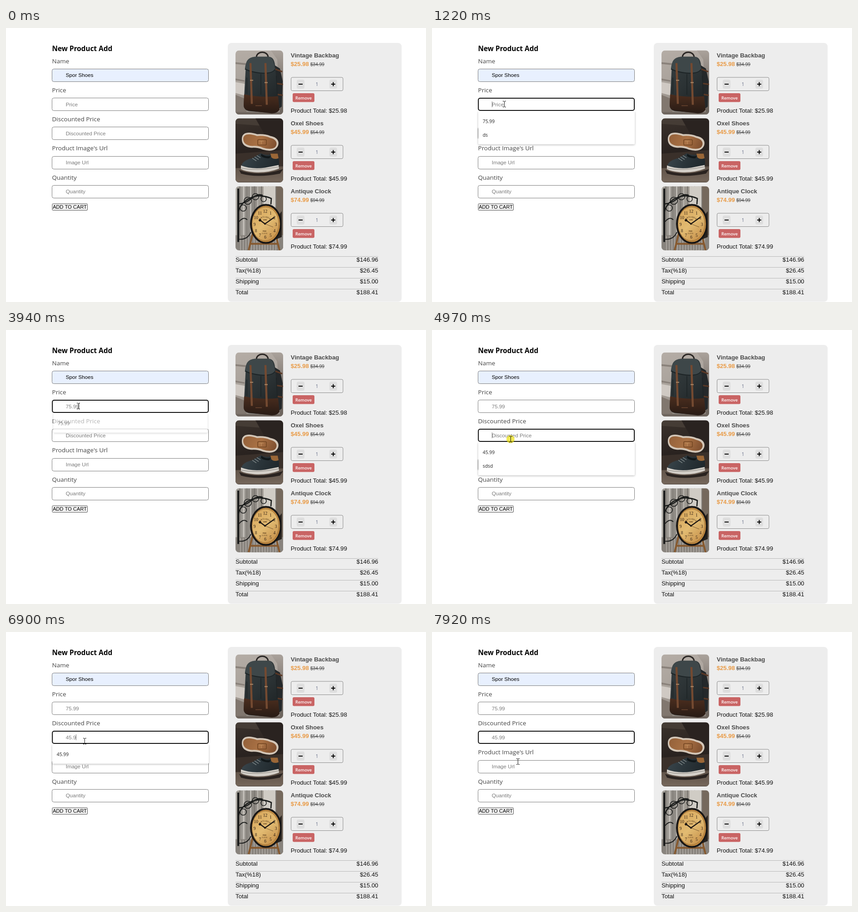
Write an HTML page with a canvas that moves like this. It is 926 px wide and 605 px high and loops after 8000 ms.

```html
<!DOCTYPE html>
<html lang="en">
<head>
<meta charset="utf-8">
<title>Product form and cart</title>
<style>
html, body { margin: 0; width: 100%; height: 100%; overflow: hidden; background: #fff; }
canvas { display: block; }
</style>
</head>
<body>
<canvas id="stage" width="926" height="605"></canvas>
<script>
const LOOP = 8000, STEP = 68, BLINK = 530, ROW = 64.2, CARD = 150.2;
const SANS = '"Liberation Sans", Arial, sans-serif';
const ROUND = '"Open Sans", "Noto Sans", sans-serif';
const SERIF = '"Liberation Serif", serif';
const stage = document.getElementById('stage');
let ctx;

function text(str, x, y, size, color, family = SANS, weight = 400, align = 'left') {
  ctx.font = `${weight} ${size}px ${family}`;
  ctx.fillStyle = color;
  ctx.textAlign = align;
  ctx.fillText(str, x, y);
}
function paint(path, fill, stroke, line) {
  if (fill) { ctx.fillStyle = fill; ctx.fill(path); }
  if (stroke) { ctx.strokeStyle = stroke; ctx.lineWidth = line; ctx.stroke(path); }
}
function box(x, y, w, h, r, fill, stroke, line = 1) {
  const path = new Path2D();
  path.roundRect(x, y, w, h, r);
  paint(path, fill, stroke, line);
  return path;
}
function oval(x, y, rx, ry, fill, stroke, line = 1) {
  const path = new Path2D();
  path.ellipse(x, y, rx, ry, 0, 0, Math.PI * 2);
  paint(path, fill, stroke, line);
}
function shape(d, fill, stroke, line = 1) {
  paint(new Path2D(d), fill, stroke, line);
}
function shade(x, y, x2, y2, ...colors) {
  const g = ctx.createLinearGradient(x, y, x2, y2);
  colors.forEach((c, i) => g.addColorStop(i / (colors.length - 1), c));
  return g;
}

// Photos, each in a 105 by 141 area
function backpack() {
  box(0, 0, 105, 142, 0, shade(0, 0, 30, 141, '#b4aca5', '#aaa39c', '#8f8780'));
  shape('M0 26 L40 30 V34 L0 30Z M0 62 L20 66 V69 L0 66Z', '#8a827b');
  shape('M0 70 L22 74 V100 L0 94Z', '#cfc9c3');
  shape('M0 98 L24 108 V141 H0Z', '#81776f');
  shape('M78 0 H105 V141 H98 L92 20Z', shade(0, 0, 0, 141, '#aaa29b', '#7d756f', '#6b635c'));
  box(0, 136, 105, 6, 0, '#6f665f');
  shape('M46 16 C46 0 72 0 72 16', null, '#2b2725', 3);
  shape('M82 30 L98 40 L104 68 L102 124 L88 134Z', '#24282a');
  shape('M84 40 L103 47 M84 72 L105 75 M86 96 L104 99', null, '#5b3825', 3);
  shape('M23 30 Q26 14 46 14 H74 Q85 15 87 32 L96 130 Q93 138 80 138 L30 134 Q19 132 18 122Z',
    shade(20, 30, 95, 120, '#353d3f', '#2b3234', '#1d2224'));
  shape('M19 97 Q57 105 94 101 L97 131 Q92 139 80 139 L28 133 Q18 130 18 121Z', shade(0, 98, 0, 138, '#4a2d1e', '#281b15'));
  shape('M21 38 Q24 15 44 14 H74 Q84 16 87 42 Q84 52 55 49 Q32 48 21 41Z', '#3e4749');
  shape('M21 41 Q34 48 55 50 Q81 52 87 42', null, '#1d2426', 2);
  shape('M25 60 V96 M56 52 V98 M90 56 L92 98', null, '#1d2325', 1.5);
  shape('M33 28 L36 118 M66 28 L69 120', null, '#744a31', 4.5);
  shape('M32 66 H39 M64 71 H71', null, '#ae8a69', 2);
  shape('M44 122 H58', null, '#6b4630', 1.5);
}

function shoes() {
  box(0, 0, 105, 142, 0, shade(0, 0, 40, 141, '#3b322c', '#2a2320', '#211c19'));
  shape('M0 0 H105 V20 L0 12Z', '#453c35');
  shape('M44 0 H105 V72 L78 60Z', '#2a2320');
  shape('M0 78 L105 70 V114 H0Z', '#3a302a');
  shape('M0 110 L105 106 V141 H0Z', shade(0, 106, 0, 141, '#5f5248', '#75675b'));
  shape('M8 114 Q50 130 105 112 L98 122 Q48 132 12 122Z', '#2a2320');
  shape('M14 44 C15 30 30 29 48 35 Q65 34 77 39 C96 42 99 57 90 66 Q81 75 60 69 Q48 64 36 65 C20 64 13 56 14 44Z', '#d3c6b7');
  shape('M17 45 C18 34 31 33 47 39 Q64 37 76 43 C91 46 94 57 87 64 Q78 70 61 65 Q49 60 37 61 C23 60 17 54 17 45Z',
    shade(18, 35, 90, 66, '#94613a', '#aa7245', '#7b4c2d'));
  box(49, 47, 19, 12, 2, null, '#704421', 1.5);
  shape('M52 50 H62 M57 50 V57', null, '#c39160', 1.2);
  shape('M13 104 Q16 93 37 88 L56 77 Q66 83 81 79 L93 79 Q98 94 95 112 L16 114Z',
    shade(20, 80, 90, 112, '#38444a', '#2a3439', '#20282c'));
  shape('M77 78 L93 78 L95 88 Q85 92 79 86Z', '#9b6737');
  shape('M57 78 Q66 86 78 83 L75 88 Q63 89 56 83Z', '#12181a');
  shape('M37 88 L46 94 M42 85 L51 91 M47 82 L55 87', null, '#8d9494', 1.2);
  shape('M12 104 Q35 113 65 109 L95 103 L96 111 Q70 121 42 119 Q20 117 12 112Z', '#d5d0c9');
  shape('M13 110 Q44 117 95 107', null, '#6d6a65', 0.8);
}

function clock() {
  box(0, 0, 105, 142, 0, shade(0, 0, 105, 0, '#a4a19b', '#8b8781', '#b0aaa1', '#8a8177'));
  for (let i = 0; i < 13; i++) {
    box(i * 8, 0, 2 + i % 3, 142, 0, i % 2 ? '#817d77' : '#bebab4');
  }
  box(62, 0, 26, 50, 0, '#d0ccc5');
  box(90, 0, 15, 142, 0, '#75695d');
  shape('M0 108 H105 V141 H0Z', '#88837d');
  for (let x = 10; x < 100; x += 6) box(x, 110, 2, 32, 0, '#a8a39d');
  shape('M38 104 L29 141 M88 104 L97 141 M33 127 H95', null, '#86592f', 4);
  box(4, 5, 4, 118, 0, '#191a1a');
  shape('M6 60 C10 28 48 12 79 27 L78 40 M6 39 C34 38 42 12 60 20', null, '#191b1a', 2.6);
  for (const [x, y, r] of [[17, 48, 7], [27, 32, 8], [44, 23, 7], [62, 28, 6]]) {
    oval(x, y, r, r, null, '#1d1e1d', 1.6);
  }
  shape('M8 117 Q27 118 34 101 M8 78 Q18 66 26 74', null, '#202120', 2);
  shape('M92 68 L102 55 V112 L90 117Z', '#28231f');
  oval(67, 83, 33, 42, '#c98f43', '#191716', 4);
  oval(66, 83, 29.5, 37.5, shade(40, 50, 94, 115, '#d7a65b', '#e2bb72', '#c48d47'), '#765228', 0.7);
  for (let hour = 1; hour <= 12; hour++) {
    const a = hour * Math.PI / 6;
    text(String(hour), 65.5 + Math.sin(a) * 23.5, 87 - Math.cos(a) * 28.5, 9.5, '#302017', SERIF, 400, 'center');
  }
  [...'ANTIQUE'].forEach((c, i) => {
    const a = (i - 3) * 0.24;
    ctx.save();
    ctx.translate(65 + Math.sin(a) * 15, 85 - Math.cos(a) * 16);
    ctx.rotate(a);
    text(c, 0, 0, 4.7, '#503519', SERIF, 700, 'center');
    ctx.restore();
  });
  text('1890', 65, 75, 4, '#553719', SANS, 700, 'center');
  text('FINE', 64, 100, 3.5, '#553719', SANS, 700, 'center');
  text('CLOCK', 64, 105, 3.5, '#553719', SANS, 400, 'center');
  shape('M65 83 L53 74 M65 83 L86 68', null, '#201914', 2.4);
  shape('M65 83 L83 90', null, '#5d4326', 0.8);
  oval(54, 75, 2.8, 2.8, '#201914');
  oval(65, 83, 2, 2, '#201914');
}

function product(i, name, price, old, photo) {
  ctx.save();
  ctx.translate(0, Math.round(i * CARD));
  ctx.save();
  ctx.clip(box(506, 49.5, 105, 141.5, 8));
  ctx.translate(506, 49.5);
  photo();
  ctx.restore();
  text(name, 627.8, 65, 13.28, '#4a4a4a', SANS, 700);
  text(price, 627.8, 84, 13.1, '#e99b47', SANS, 700);
  text(old, 671, 84, 10.1, '#444');
  box(671, 80, 31, 1, 0, '#444');
  box(628.5, 109, 114.5, 29.5, 3, null, '#8c8c8c');
  box(641, 114, 17, 20, 4, '#dedede');
  box(713, 114, 17, 20, 4, '#dedede');
  shape('M645 124 H654 M717 124 H726 M721.5 119.5 V128.5', null, '#000', 2);
  text('1', 685.7, 127.5, 10, '#5c6480', ROUND, 400, 'center');
  box(632, 144, 48, 19.5, 3, '#c96464');
  text('Remove', 656, 157.5, 9.3, '#fff', ROUND, 600, 'center');
  text('Product Total: ' + price, 627.8, 187, 13.15, '#111');
  ctx.restore();
}

function scenery() {
  box(0, 0, 926, 605, 0, '#fff');
  text('New Product Add', 101.5, 50.5, 15.4, '#000', ROUND, 700);
  ['Name', 'Price', 'Discounted Price', "Product Image's Url", 'Quantity'].forEach((label, i) =>
    text(label, 101.5, 77.8 + i * ROW, 13.5, '#444', ROUND));
  box(102, 388, 77.5, 14.5, 1.5, '#f2f2f2', '#555');
  text('ADD TO CART', 103.2, 399, 11.1, '#000');

  box(489, 33, 383.3, 571.5, 8, '#ededed');
  product(0, 'Vintage Backbag', '$25.98', '$34.99', backpack);
  product(1, 'Oxel Shoes', '$45.99', '$54.99', shoes);
  product(2, 'Antique Clock', '$74.99', '$94.99', clock);
  [['Subtotal', '$146.96'], ['Tax(%18)', '$26.45'], ['Shipping', '$15.00'], ['Total', '$188.41']].forEach(([label, sum], i) => {
    const y = Math.round(i * 24.1);
    box(506, 504 + y, 314.5, 1, 0, '#b8b8b8');
    text(label, 506, 516 + y, 13.25, '#111');
    text(sum, 820.7, 516 + y, 13.25, '#111', SANS, 400, 'right');
  });
}

// Form state over time
const edits = {
  1: { hint: 'Price', focus: 1150, blur: 4970, shrink: 2150, close: 3940, items: ['75.99', 'ds'],
       value: '75.99', keys: [2080, 2350, 3280, 3740, 3870] },
  2: { hint: 'Discounted Price', focus: 4970, blur: LOOP, shrink: 5970, close: 7170, items: ['45.99', 'sdsd'],
       value: '45.99', keys: [5840, 5970, 6500, 6900, 7100] }
};

function field(i, str, color, focused) {
  const y = Math.round(90 + i * ROW);
  const fill = i ? '#fff' : '#e8f0fe';
  if (focused) box(102.2, y + 1, 343.8, 27, 4, fill, '#101010', 2);
  else box(101.5, y + 0.5, 345, 28, 4, fill, '#7c7c7c');
  text(str, 131.7, 108.3 + i * ROW, 11.65, color);
}

function editField(i, t) {
  const e = edits[i];
  const pressed = e.keys.filter(k => k <= t);
  const str = e.value.slice(0, pressed.length);
  const focused = t >= e.focus && t < e.blur;
  field(i, str || e.hint, '#7b7b7b', focused);
  const since = t - Math.max(e.focus, ...pressed);
  if (focused && since % (2 * BLINK) < BLINK) {
    ctx.font = `11.65px ${SANS}`;
    box(Math.round(131.7 + ctx.measureText(str).width), Math.round(98 + i * ROW), 1, 13, 0, '#777');
  }
}

function suggestions(i, t) {
  const e = edits[i];
  if (t < e.focus || t >= e.close + 135) return;
  const fade = Math.floor((t - e.close) / 70) + 1;
  const items = e.items.slice(0, t < e.shrink ? 2 : 1);
  const top = Math.round(120 + i * ROW) - 0.5;
  const height = 13 + items.length * 30;
  ctx.save();
  if (fade > 0) {
    ctx.globalAlpha = fade > 1 ? 0.15 : 0.6;
    ctx.translate(274.5, 0);
    ctx.scale(1 - fade * 0.015, 1);
    ctx.translate(-274.5, 0);
  }
  // Keep the shadow outside the panel so that it does not show through while fading
  ctx.save();
  const outside = new Path2D();
  outside.rect(90, top, 370, height + 12);
  outside.roundRect(102, top, 345, height, 2);
  ctx.clip(outside, 'evenodd');
  ctx.shadowColor = 'rgba(0,0,0,.28)';
  ctx.shadowBlur = 4;
  ctx.shadowOffsetY = 1.5;
  box(102, top, 345, height, 2, '#fff');
  ctx.restore();
  box(102, top, 345, height, 2, '#fff');
  items.forEach((item, n) => text(item, 111.7, top + 26 + n * 30, 10.4, '#222', ROUND));
  ctx.restore();
}

// Pointer: runs of discrete steps along curves
const runs = [
  { start: 250, steps: 12, from: [762, 548], bend: [340, 250], to: [159, 168], ease: p => 1 - (1 - p) ** 2 },
  { start: 4430, steps: 6, from: [159, 168], bend: [148, 212], to: [173, 241], ease: p => p * p * (3 - 2 * p) },
  { start: 7650, steps: 5, from: [173, 241], bend: [186, 262], to: [190, 289], ease: p => p * (2 - p) }
];

function pointer(t) {
  const run = runs.filter(r => r.start <= t).pop();
  if (!run) return;
  const n = Math.min(run.steps - 1, Math.floor((t - run.start) / STEP));
  const p = run.ease(n / (run.steps - 1)), q = 1 - p;
  const [x, y] = run.from.map((a, k) => Math.round(q * q * a + 2 * q * p * run.bend[k] + p * p * run.to[k]));
  if ((t >= 1070 && t < 1220) || (t >= 4970 && t < 5040)) oval(x, y, 9, 9, 'rgba(235,225,20,.72)');
  const inField = x > 101 && x < 447 && (y - 90 + ROW * 5) % ROW < 29;
  ctx.save();
  ctx.translate(x, y);
  if (inField) {
    shape('M-3 -6.5 H-1 L.5 -5.5 L2 -6.5 H4 M.5 -5.5 V5.5 M-3 6.5 H-1 L.5 5.5 L2 6.5 H4', null, '#111', 1);
  } else {
    shape('M.5 .5 V15 L4 12 L6.5 17.5 L8.8 16.5 L6.5 11 H11Z', '#fff', '#111', 1);
  }
  ctx.restore();
}

const backdrop = document.createElement('canvas');
backdrop.width = stage.width;
backdrop.height = stage.height;
ctx = backdrop.getContext('2d');
scenery();
ctx = stage.getContext('2d');

function draw(t) {
  ctx.drawImage(backdrop, 0, 0);
  field(0, 'Spor Shoes', '#000', t >= 1070 && t < 1140);
  editField(1, t);
  editField(2, t);
  field(3, 'Image Url', '#7b7b7b');
  field(4, 'Quantity', '#7b7b7b');
  suggestions(1, t);
  suggestions(2, t);
  pointer(t);
}

const begin = performance.now();
function tick() {
  draw((performance.now() - begin) % LOOP);
  requestAnimationFrame(tick);
}
tick();
</script>
</body>
</html>
```
